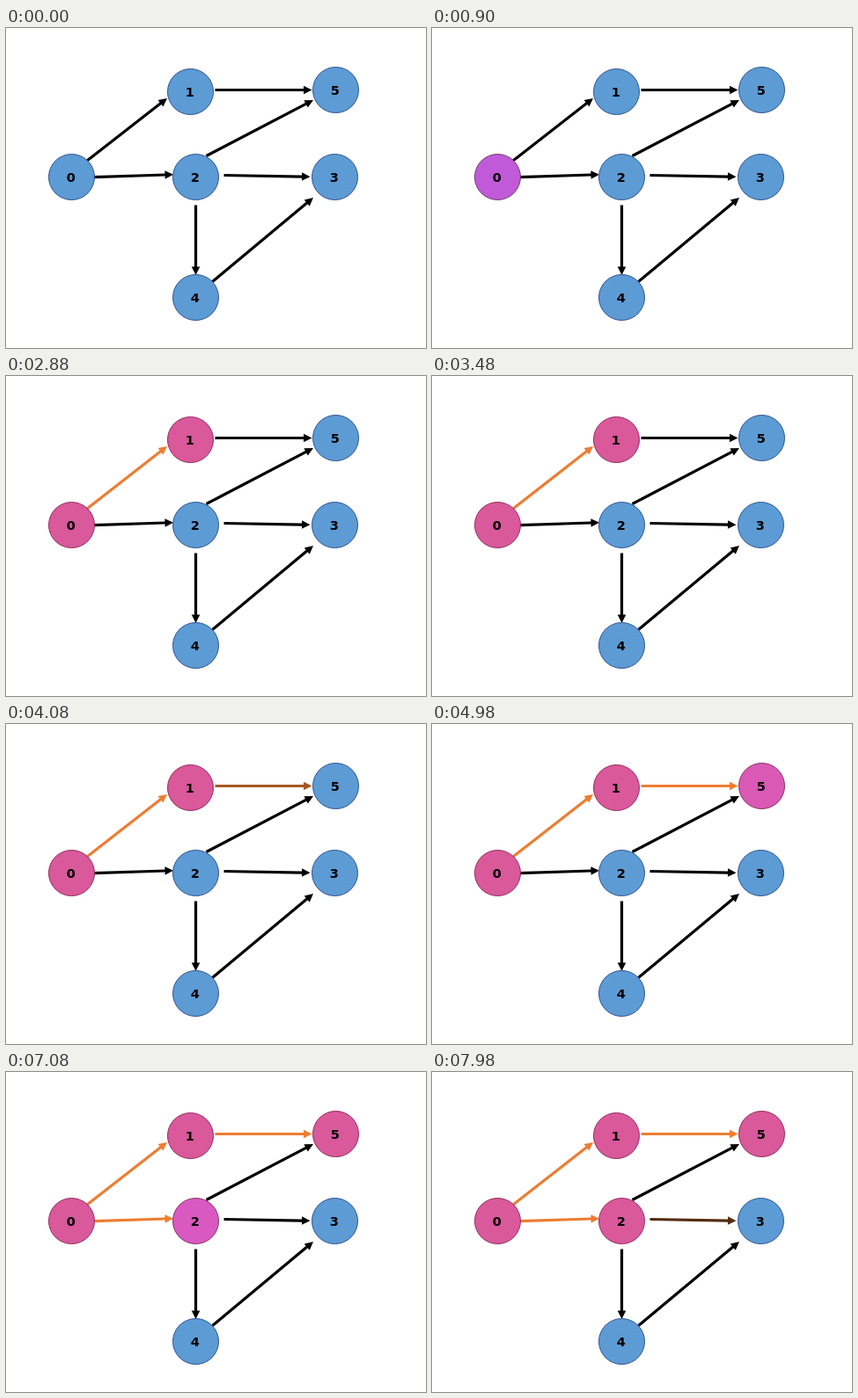
An HTML page that plays this animation: 477 by 364 pixels, repeating every 8 s.

```html
<!DOCTYPE html>
<html lang="en">
<head>
<meta charset="utf-8">
<title>Depth-first traversal</title>
<style>
  html, body { margin: 0; width: 100%; height: 100%; overflow: hidden; background: #fff; }
  svg { display: block; width: 477px; height: 364px; }
  text { font: bold 14.5px "DejaVu Sans", Verdana, sans-serif; text-anchor: middle; }
</style>
</head>
<body>
<svg id="stage" viewBox="0 0 477 364"></svg>
<script>
const LOOP = 8000, STEP = 60, FADE = 600, NODE_DELAY = 780, ROOT_START = 500;
const RADIUS = 26, LINE = 1.6, HEAD = 9.5;

const centres = [
  [74.5, 169.5], [209.5, 72.5], [215.5, 169.5],
  [373.5, 169.5], [215.5, 306.5], [374.5, 70.5]
];

// Tail and tip of each arrow; the walked ones come first, in walking order.
const edges = [
  [92, 151, 183, 80],
  [237.5, 70.5, 347.5, 70.5],
  [100, 169.6, 190, 166.7],
  [247.5, 167.5, 345.5, 169.2],
  [227.5, 145.5, 349, 82],
  [215.5, 201.5, 215.5, 281],
  [234.5, 288.5, 349, 193]
];
const visited = [0, 1, 5, 2];

// The walk quickens a little with every edge.
const edgeStart = i => i < visited.length ? 1380 + 2355 * i - 75 * i * i : Infinity;

function nodeStart(label) {
  const order = visited.indexOf(label);
  if (order < 0) return Infinity;
  return order ? edgeStart(order - 1) + NODE_DELAY : ROOT_START;
}

const stage = document.getElementById('stage');

function add(parent, tag, attrs) {
  const el = document.createElementNS('http://www.w3.org/2000/svg', tag);
  for (const key in attrs) el.setAttribute(key, attrs[key]);
  return parent.appendChild(el);
}

const mix = (a, b, p) => a.map((v, i) => v + (b[i] - v) * p);
const hsl = ([h, s, l]) => `hsl(${h}, ${s}%, ${l}%)`;
const rgb = c => `rgb(${c.map(Math.round).join(',')})`;
const progress = (time, start) => Math.min(1, Math.max(0, (time - start) / FADE));

const arrows = edges.map(([x1, y1, x2, y2], i) => {
  const length = Math.hypot(x2 - x1, y2 - y1);
  const angle = Math.atan2(y2 - y1, x2 - x1) * 180 / Math.PI;
  const shape = add(stage, 'path', {
    transform: `translate(${x1} ${y1}) rotate(${angle})`,
    d: `M0 ${-LINE}H${length - HEAD}V${-HEAD / 2}L${length} 0L${length - HEAD} ${HEAD / 2}V${LINE}H0Z`
  });
  return { shape, start: edgeStart(i) };
});

const discs = centres.map(([cx, cy], label) => {
  const shape = add(stage, 'circle', { cx, cy, r: RADIUS });
  add(stage, 'text', { x: cx - 0.6, y: cy + 5.7 }).textContent = label;
  return { shape, start: nodeStart(label) };
});

function draw() {
  const time = Math.floor(performance.now() % LOOP / STEP) * STEP;
  for (const { shape, start } of arrows) {
    shape.setAttribute('fill', rgb(mix([0, 0, 0], [237, 125, 49], progress(time, start))));
  }
  // Hue travels from blue through violet to pink.
  for (const { shape, start } of discs) {
    const p = progress(time, start);
    shape.setAttribute('fill', hsl(mix([209, 59, 60], [329, 63, 60], p)));
    shape.setAttribute('stroke', rgb(mix([47, 82, 143], [146, 44, 92], p)));
  }
  requestAnimationFrame(draw);
}

draw();
</script>
</body>
</html>
```
